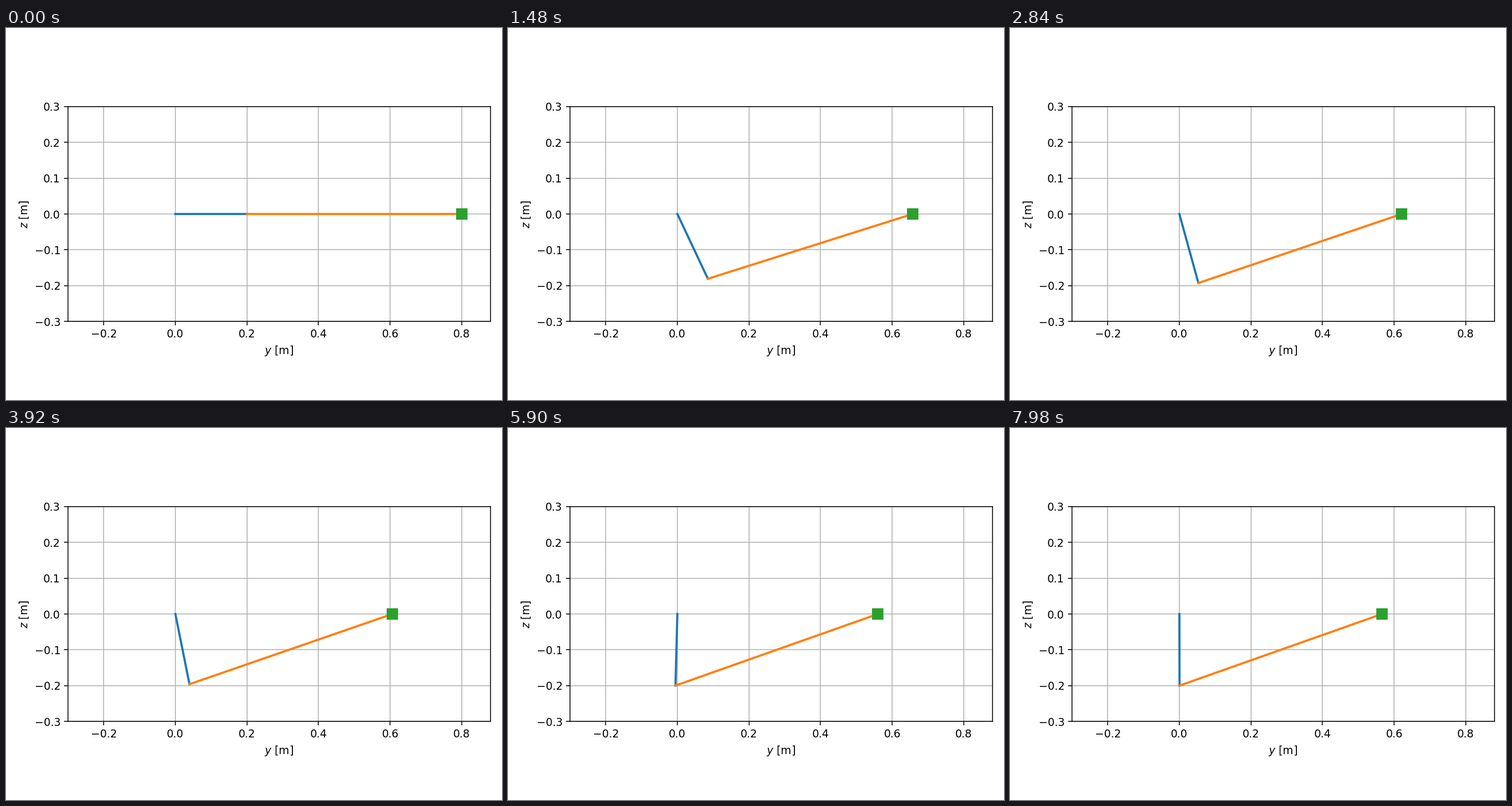
A matplotlib script that plays this animation: 864 px wide and 648 px high, repeating every 8000 ms.

```python
import numpy as np
import matplotlib.pyplot as plt
from matplotlib.animation import FuncAnimation

# Slider-crank falling under gravity, with viscous damping at the crank.
CRANK, ROD = 0.2, 0.6
M_CRANK, M_ROD, M_SLIDER = 1.0, 1.0, 7 / 6
GRAVITY, DAMPING = 9.81, 0.0785
FRAMES, INTERVAL, SUBSTEPS = 400, 20, 10


def inertia(a):
    """Effective inertia about the crank, a measured from straight down."""
    s, c = np.sin(a), np.cos(a)
    r = CRANK / ROD
    q = np.sqrt(1 - (r * c) ** 2)
    k = r * s / q
    rod = (c * (1 + k / 2)) ** 2 + s * s / 4 + (s / q) ** 2 / 12
    slider = (c * (1 + k)) ** 2
    return CRANK**2 * (M_CRANK / 3 + M_ROD * rod + M_SLIDER * slider)


def rate(state):
    a, w = state
    eps = 1e-5
    slope = (inertia(a + eps) - inertia(a - eps)) / (2 * eps)
    weight = GRAVITY * CRANK / 2 * (M_CRANK + M_ROD) * np.sin(a)
    return np.array([w, -(weight + DAMPING * w + slope * w * w / 2) / inertia(a)])


def simulate():
    h = INTERVAL / 1000 / SUBSTEPS
    state = np.array([np.pi / 2, 0.0])
    angles = []
    for _ in range(FRAMES):
        angles.append(state[0])
        for _ in range(SUBSTEPS):
            k1 = rate(state)
            k2 = rate(state + h / 2 * k1)
            k3 = rate(state + h / 2 * k2)
            k4 = rate(state + h * k3)
            state = state + h / 6 * (k1 + 2 * k2 + 2 * k3 + k4)
    return angles


angles = simulate()

W, H, DPI = 864, 648, 135
left, width = 108, 735.75
height = width * 0.6 / 1.18

fig = plt.figure(figsize=(W / DPI, H / DPI), dpi=DPI)
ax = fig.add_axes([left / W, (H - height) / 2 / H, width / W, height / H])
ax.set_xlim(-0.3, 0.88)
ax.set_ylim(-0.3, 0.3)
ax.set_xticks(np.arange(-1, 5) * 0.2)
ax.set_yticks(np.arange(-3, 4) * 0.1)
ax.set_xlabel("$y$ [m]")
ax.set_ylabel("$z$ [m]")
ax.grid(True)

crank, = ax.plot([], [], color="C0", lw=2)
rod, = ax.plot([], [], color="C1", lw=2)
slider, = ax.plot([], [], "s", color="C2", ms=10)


def update(i):
    y, z = CRANK * np.sin(angles[i]), -CRANK * np.cos(angles[i])
    end = y + np.sqrt(ROD**2 - z * z)
    crank.set_data([0, y], [0, z])
    rod.set_data([y, end], [z, 0])
    slider.set_data([end], [0])
    return crank, rod, slider


def init():
    return update(0)


anim = FuncAnimation(fig, update, frames=FRAMES, init_func=init,
                     interval=INTERVAL, repeat=True, repeat_delay=0, blit=True)
plt.show()
```
